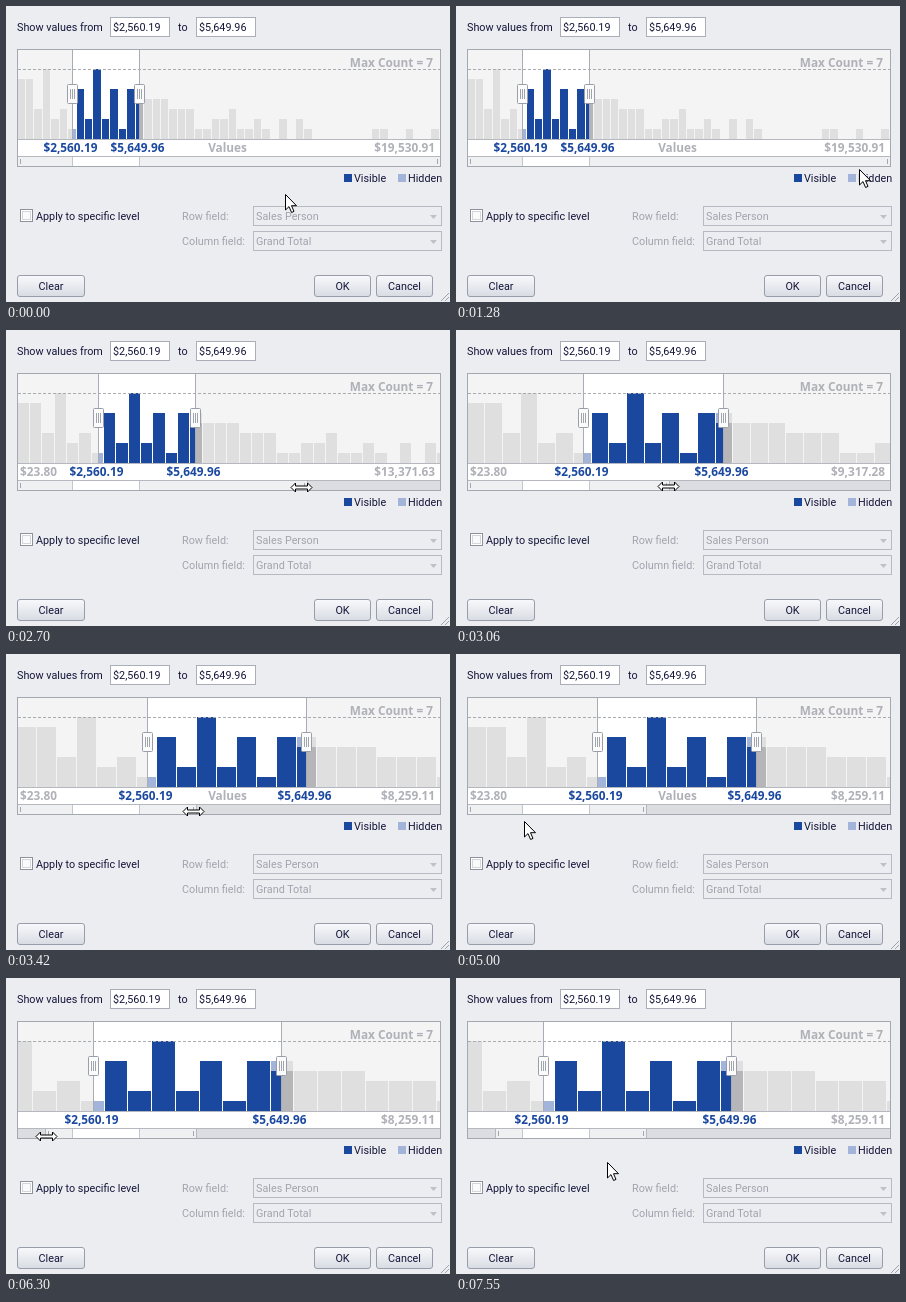
An HTML page for the animation above (8 s loop, 444 by 296 pixels).

```html
<!DOCTYPE html>
<html lang="en">
<head>
<meta charset="utf-8">
<title>Range filter</title>
<style>
html, body { margin: 0; width: 100%; height: 100%; overflow: hidden; background: #ebedf0; }
svg { display: block; }
text { font: 10.8px Roboto, "Open Sans", sans-serif; fill: #15153a; white-space: pre; }
.off { fill: #a2a4ae; }
.bold { font: bold 11.8px "Noto Sans", "Open Sans", sans-serif; fill: #b0b1b8; }
.blue { fill: #1b489f; }
.mid { text-anchor: middle; }
.end { text-anchor: end; }
</style>
</head>
<body>
<svg width="444" height="296" viewBox="0 0 444 296">
  <defs>
    <linearGradient id="face" x2="0" y2="1">
      <stop offset="0" stop-color="#f8f9fb"/><stop offset="1" stop-color="#d8dce3"/>
    </linearGradient>
    <clipPath id="plot"><rect x="12" y="44" width="422" height="89"/></clipPath>
    <clipPath id="inside"><rect id="window" y="44" height="89"/></clipPath>
  </defs>
  <rect width="444" height="296" fill="#ebedf0"/>
  <g id="form"></g>
  <g id="chart"></g>
  <g id="pointer"></g>
</svg>
<script>
const LOOP = 8000, LEFT = 12, WIDTH = 422, BASE = 133;
const MIN = 23.8, MAX = 19530.91, LOW = 2560.19, HIGH = 5649.96;
const counts = [6,6,3,7,2,3,1,5,2,7,2,5,1,5,5,3,4,4,3,3,3,1,1,2,2,3,1,1,2,1,
  0,2,0,2,1,0,0,0,0,0,0,0,1,1,0,0,1,0,0,1];
// Bins 15 to 17 share one height with the visible part of bin 14.
counts[15] = 4;
const visibleCount = i => i < 7 || i > 14 ? 0 : i === 14 ? 4 : counts[i];
const $ = id => document.getElementById(id);

const rect = (x, y, w, h, fill, extra = '') =>
  `<rect x="${x}" y="${y}" width="${Math.max(0, w)}" height="${h}" fill="${fill}" ${extra}/>`;
const frame = (x, y, w, h, fill, stroke, extra = '') =>
  rect(x + .5, y + .5, w - 1, h - 1, fill, `stroke="${stroke}" ${extra}`);
const path = (d, stroke, extra = '') => `<path d="${d}" fill="none" stroke="${stroke}" ${extra}/>`;
const text = (x, y, s, cls = '') => `<text x="${x}" y="${y}" class="${cls}">${s}</text>`;
const money = v => '$' + v.toLocaleString('en-US', { minimumFractionDigits: 2, maximumFractionDigits: 2 });

const field = (x, s) => frame(x, 11, 60, 20, '#fff', '#a9aeb8') + text(x + 3, 25, s);
const button = (x, w, s) => frame(x, 269, w, 22, 'url(#face)', '#979daa', 'rx="2.5"') +
  text(x + w / 2, 284, s, 'mid');
const combo = (y, label, s) => text(176, y + 14, label, 'off') +
  frame(247, y, 189, 20, '#ebedf0', '#b6bac2') + text(250, y + 14, s, 'off') +
  `<path d="M424 ${y + 9}h7l-3.5 4z" fill="#bec1c8"/>`;

$('form').innerHTML =
  text(11, 25, 'Show values from') + field(104, money(LOW)) + text(172, 25, 'to') + field(190, money(HIGH)) +
  rect(338, 168, 8, 8, '#1b489f') + text(348, 176, 'Visible') +
  rect(392, 168, 8, 8, '#a3b4da') + text(402, 176, 'Hidden') +
  frame(14, 203, 13, 13, '#fff', '#8d929c') + frame(16, 205, 9, 9, '#fafafb', '#d3d6dc') +
  text(30, 214, 'Apply to specific level') +
  combo(200, 'Row field:', 'Sales Person') + combo(225, 'Column field:', 'Grand Total') +
  button(11, 68, 'Clear') + button(308, 57, 'OK') + button(370, 57, 'Cancel') +
  path('M435 295l8-8M439 295l4-4', '#9ea3ad');

// Cubic interpolation through [time, value] keys, at rest at both ends.
function track(keys, t) {
  const last = keys.length - 1;
  if (t <= keys[0][0]) return keys[0][1];
  if (t >= keys[last][0]) return keys[last][1];
  const i = keys.findIndex(k => k[0] > t) - 1;
  const slope = n => n === 0 || n === last ? 0 :
    (keys[n + 1][1] - keys[n - 1][1]) / (keys[n + 1][0] - keys[n - 1][0]);
  const [t0, a] = keys[i], [t1, b] = keys[i + 1], d = t1 - t0, u = (t - t0) / d;
  return a + (b - a) * u * u * (3 - 2 * u) +
    d * u * (1 - u) * (slope(i) * (1 - u) - slope(i + 1) * u);
}

const viewEnd = [[1910, MAX], [2390, 16770.47], [3050, 9317.28], [3410, 8259.11]];
const viewStart = [[5760, MIN], [6300, 1324]];
const moves = [
  { start: 740, x: [[740, 279], [1280, 403], [1640, 430]], y: [[740, 188], [1280, 163], [1640, 157]] },
  { start: 1910, x: [[1910, 430], [2390, 366], [3050, 212], [3410, 187]], y: [[1910, 157], [2390, 159], [3050, 157], [3410, 158]] },
  { start: 4160, x: [[4160, 187], [5000, 68], [5360, 12]], y: [[4160, 158], [4640, 170], [5000, 167], [5360, 157]] },
  { start: 5760, x: [[5760, 12], [6300, 40]], y: [[5760, 157], [6300, 159]] },
  { start: 6700, x: [[6700, 40], [7540, 151]], y: [[6700, 159], [7540, 184]] }
];

function bars(scale, paint) {
  const step = (MAX - MIN) / counts.length;
  return counts.map((n, i) => {
    const x = Math.floor(scale(MIN + i * step)), w = Math.floor(scale(MIN + (i + 1) * step)) - x - 1;
    const shown = visibleCount(i);
    return (n > shown ? rect(x, BASE - n * 10, w, (n - shown) * 10, paint.hidden) : '') +
      (shown ? rect(x, BASE - shown * 10, w, shown * 10, paint.visible) : '');
  }).join('');
}

const handle = x => frame(x - 5, 78, 11, 20, '#fbfbfc', '#999ea8', 'rx="1"') +
  path(`M${x - 1.5} 83v10M${x + .5} 83v10M${x + 2.5} 83v10`, '#a0a4ac');

function drawChart(from, to) {
  const scale = v => LEFT + (v - from) / (to - from) * WIDTH;
  const full = v => Math.round(LEFT + (v - MIN) / (MAX - MIN) * WIDTH);
  const lo = Math.floor(scale(LOW)), hi = Math.floor(scale(HIGH));
  const thumbL = full(from), thumbR = full(to), selL = full(LOW), selR = full(HIGH);
  const startLabel = money(from), half = 27.5, loLabel = lo - 1.5, hiLabel = hi - 1.5;
  const startFits = 14 + startLabel.length * 6.2 < loLabel - half;
  const valuesFit = hiLabel + half + 8 < 203 ||
    (loLabel + half + 8 < 203 && hiLabel - half - 8 > 240);
  $('window').setAttribute('x', lo);
  $('window').setAttribute('width', hi - lo);

  $('chart').innerHTML =
    rect(12, 44, 422, 89, '#f4f4f5') +
    `<g clip-path="url(#plot)">${bars(scale, { hidden: '#dfdfe0', visible: '#b6b6b9' })}</g>` +
    `<g clip-path="url(#inside)">${rect(12, 44, 422, 89, '#fff')}${bars(scale, { hidden: '#a3b4da', visible: '#1b489f' })}</g>` +
    path('M12 63.5H434', '#a9abb0', 'stroke-dasharray="3 2"') +
    text(427, 61, 'Max Count = 7', 'bold end') +
    rect(12, 133, 422, 17, '#fff') + path('M12 133.5H434', '#b5b8be') +
    path(`M${lo + .5} 44V133M${hi + .5} 44V133`, '#a8acb4') + handle(lo) + handle(hi) +
    (startFits ? text(14, 146, startLabel, 'bold') : '') +
    (valuesFit ? text(221.5, 146, 'Values', 'bold mid') : '') +
    text(429, 146, money(to), 'bold end') +
    text(loLabel, 146, money(LOW), 'bold blue mid') + text(hiLabel, 146, money(HIGH), 'bold blue mid') +
    rect(12, 150, 422, 10, '#dcdde1') + rect(thumbL, 150, thumbR - thumbL, 10, '#eff0f2') +
    rect(selL, 150, selR - selL, 10, '#fff') +
    path('M12 150.5H434', '#b5b8be') +
    path(`M${selL - .5} 151v9M${selR - .5} 151v9`, '#c3c6cc') +
    path(`M${thumbL + 2.5} 153v5M${thumbR - 2.5} 153v5`, '#a2a6ae') +
    (thumbL > LEFT ? path(`M${thumbL - .5} 151v9`, '#b5b8be') : '') +
    (thumbR < 434 ? path(`M${thumbR + .5} 151v9`, '#b5b8be') : '') +
    frame(11, 43, 424, 118, 'none', '#a4a8b0');
}

const ARROW = 'M.5 .5V16L4 12.6L6.6 18.5L9 17.4L6.5 11.7H11.5Z';
const RESIZE = 'M-10.5 0L-6-4.5V-1.5H6V-4.5L10.5 0L6 4.5V1.5H-6V4.5Z';

function drawPointer(t, move) {
  const x = Math.round(track(move.x, t)), y = Math.round(track(move.y, t));
  const resizing = (t >= 1580 && t < 4340) || (t >= 5240 && t < 6880);
  const at = resizing ? `${x + .5} ${y - .5}` : `${x} ${y}`;
  $('pointer').innerHTML =
    `<path d="${resizing ? RESIZE : ARROW}" transform="translate(${at})" fill="#fff" stroke="#000"/>`;
}

function draw(now) {
  const time = now % LOOP;
  const move = moves.filter(m => m.start <= time).pop() || moves[0];
  const t = move.start + Math.floor((time - move.start) / 60) * 60;
  drawChart(track(viewStart, t), track(viewEnd, t));
  drawPointer(t, move);
}

const begin = performance.now();
function tick() {
  draw(performance.now() - begin);
  requestAnimationFrame(tick);
}
tick();
</script>
</body>
</html>
```
